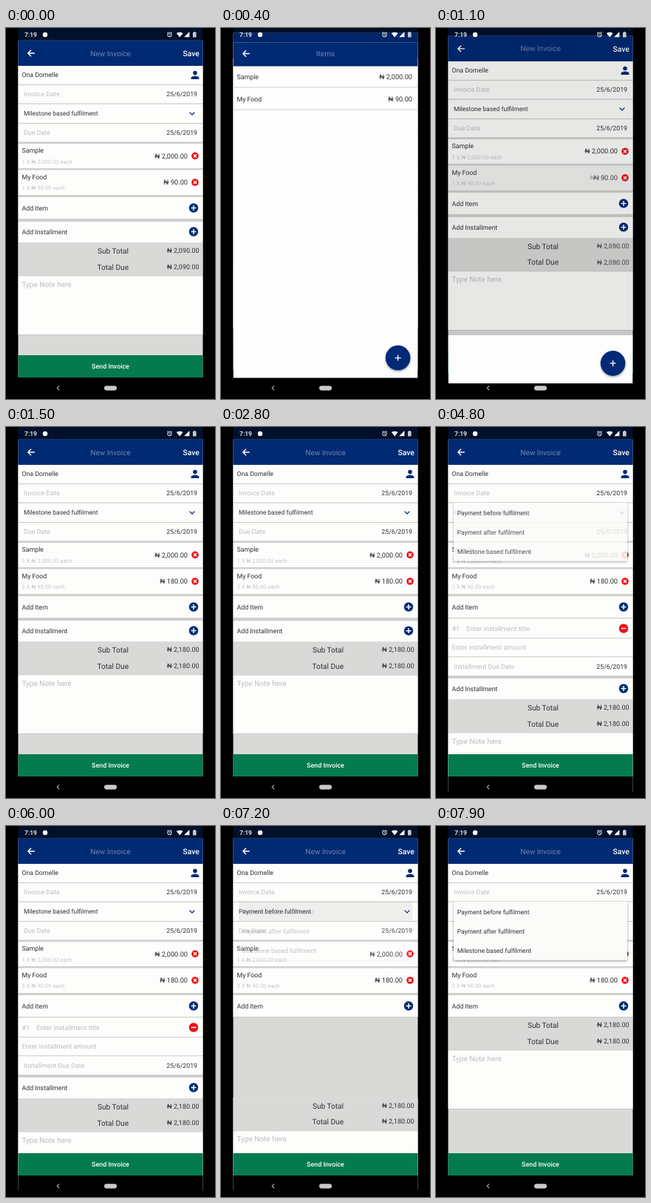
Animation, 283 px wide and 500 px high, one loop 8 s. Source, as an HTML page:

```html
<!DOCTYPE html>
<html lang="en">
<head>
<meta charset="utf-8">
<title>New Invoice</title>
<style>
html, body { margin: 0; width: 100%; height: 100%; overflow: hidden; background: #000; }
svg { display: block; width: 100%; height: 100%; }
text { font-family: Roboto, "Noto Sans", sans-serif; text-rendering: geometricPrecision; white-space: pre; }
</style>
</head>
<body>
<svg id="stage" viewBox="0 0 283 500"></svg>
<script>
const LOOP = 8000, STEP = 100;
const BLUE = '#002a74', NAVY = '#01102b', RED = '#f30d14', GREEN = '#047b4e', WHITE = '#fdfefc',
      GREY = '#d9dad8', LINE = '#cfd0ce', INK = '#303030', HINT = '#bcbcbc';
const TOP = 16.5, BOTTOM = 471, LEFT = 16.5, WIDTH = 250;

// y is the middle of the capitals
const text = (x, y, s, size, fill = INK, extra = '') =>
  `<text x="${x}" y="${y + size * 0.355}" font-size="${size}" fill="${fill}" ${extra}>${s}</text>`;
const endText = (x, y, s, size, fill = INK) => text(x, y, s, size, fill, 'text-anchor="end"');
const midText = (x, y, s, size, fill, weight = 400) =>
  text(x, y, s, size, fill, `text-anchor="middle" font-weight="${weight}"`);
const box = (y1, y2, fill, x = LEFT, w = WIDTH) =>
  `<rect x="${x}" y="${y1}" width="${w}" height="${y2 - y1}" fill="${fill}"/>`;
const stroke = (d, color, width) =>
  `<path d="${d}" fill="none" stroke="${color}" stroke-width="${width}"/>`;
const group = (id, body, extra = '') => `<g id="${id}" ${extra}>${body}</g>`;
const badge = (x, y, r, fill, d) =>
  `<g transform="translate(${x} ${y})"><circle r="${r}" fill="${fill}"/>${stroke(d, '#fff', 1.5)}</g>`;
const plus = y => badge(254, y, 6.2, BLUE, 'M-3.4 0H3.4M0 -3.4V3.4');
const minus = y => badge(254, y, 6.2, RED, 'M-3.5 0H3.5');
const cross = y => badge(256, y, 4.8, RED, 'M-2 -2L2 2M2 -2L-2 2');
const price = n => '₦ ' + n.toLocaleString('en-US', { minimumFractionDigits: 2 });

const header = title => box(0, TOP, NAVY) + box(TOP, 51, BLUE) +
  stroke('M38.8 34H30M34 29.8L29.8 34L34 38.2', '#fff', 1.4) +
  midText(141.5, 34, title, 10.1, '#6f83b0');

// a value shown before and after the quantity changes
const swap = (y, x, before, after, size) =>
  `<g class="before">${endText(x, y, price(before), size)}</g>
   <g class="after">${endText(x, y, price(after), size)}</g>`;

const dateRow = (y, label) => text(24, y, label, 8.9, HINT) + endText(259, y, '25/6/2019', 8.75);

const form =
  box(51, 76, WHITE) + box(76, 77.2, LINE) +
  box(77.2, 101.6, WHITE) + box(101.6, 102.8, LINE) +
  box(102.8, 128, WHITE) + box(128, 129.2, LINE) +
  box(129.2, 153.5, WHITE) + box(153.5, 156, LINE) +
  box(156, 189, WHITE) + box(189, 191.5, LINE) +
  box(191.5, 225, WHITE) + group('flash', box(191.5, 225, '#000')) + box(225, 228, LINE) +
  box(228, 257, WHITE) + box(257, 258.2, LINE) +
  text(21.5, 63, 'Ona Domelle', 8.7) +
  `<circle cx="256" cy="60.6" r="2.8" fill="${BLUE}"/>
   <path d="M250.6 69V67.4C250.6 63.8 261.4 63.8 261.4 67.4V69Z" fill="${BLUE}"/>` +
  dateRow(89, 'Invoice Date') +
  group('mode', text(24, 115, '', 8.5)) +
  stroke('M248.6 113.6L252 117L255.4 113.6', BLUE, 1.3) +
  dateRow(141, 'Due Date') +
  text(21.5, 165, 'Sample', 8.8) + text(21.5, 180, '1 X ₦ 2,000.00 each', 7.6, '#c6c6c6') +
  endText(246, 172.3, price(2000), 9.2) + cross(172.3) +
  text(21.5, 201, 'My Food', 8.8) + group('count', text(21.5, 215.5, '', 7.6, '#c6c6c6')) +
  swap(208, 246, 90, 180, 9.2) + cross(208) +
  text(21.5, 242.5, 'Add Item', 8.8) + plus(242.5);

const installment =
  box(258.2, 284, WHITE) + box(284, 285, LINE) +
  box(285, 309.3, WHITE) + box(309.3, 310.3, LINE) +
  box(310.3, 335, WHITE) +
  text(21.5, 271.5, '#1', 9.1, HINT) + text(41, 271.5, 'Enter installment title', 9.1, HINT) +
  minus(271.5) + text(21.5, 297, 'Enter installment amount', 9, HINT) +
  dateRow(322.5, 'Installment Due Date');

const addRow = box(257, 261, LINE) + box(261, 289, WHITE) +
  text(21.5, 274.5, 'Add Installment', 8.8) + plus(274.5);

const totals = box(289, 333.5, GREY) +
  endText(166, 300.5, 'Sub Total', 10.1) + swap(300, 261.5, 2090, 2180, 9) +
  endText(166, 322, 'Total Due', 10.1) + swap(321.5, 261.5, 2090, 2180, 9) +
  box(333.5, 334.5, LINE) + box(334.5, 413, WHITE) + box(413, 414, '#c6c7c5') +
  text(21.5, 345, 'Type Note here', 10, HINT);

const modes = ['Payment before fulfilment', 'Payment after fulfilment', 'Milestone based fulfilment'];
const menu = group('panel',
  '<rect x="24" y="102" width="235" height="78.5" rx="1" fill="#fbfcfa" filter="url(#shade)"/>') +
  group('pressed', box(102, 128, '#000', 24, 235), 'opacity="0.2"') +
  modes.map((m, i) => text(28.7, 115.5 + 26 * i, m, 8.5)).join('');

const itemRow = (y, name, n) => text(21.5, y, name, 8.8) + endText(259, y, price(n), 9.2) +
  box(y + 14, y + 15, LINE);
const items = box(TOP, BOTTOM, '#fefefe') + header('Items') +
  itemRow(65, 'Sample', 2000) + itemRow(95, 'My Food', 90) +
  `<circle cx="239.6" cy="444" r="16.8" fill="${BLUE}" filter="url(#shade)"/>` +
  stroke('M235.6 444H243.6M239.6 440V448', '#fff', 1.3);

const statusIcons =
  text(25, 9, '7:19', 8.6, '#fff', 'font-weight="500"') +
  `<circle cx="53" cy="9" r="3.2" fill="#fff"/>
   <circle cx="221.5" cy="9.2" r="2.7" fill="none" stroke="#fff" stroke-width="1"/>` +
  stroke('M221.5 7.7V9.4L222.7 10.2M218.2 6.8L220 5.2M224.8 6.8L223 5.2', '#fff', 0.8) +
  `<path d="M230.8 7Q235.2 4.4 239.6 7L235.2 12.4ZM241.2 12.3L248.4 5V12.3Z" fill="#fff"/>
   <path d="M253 6H254.2V5H256.4V6H257.6V12.6H253Z" fill="#c4c8d0"/>`;

const navIcons =
  stroke('M72 482.4L69.2 485.2L72 488', '#b5b5b5', 1.1) +
  '<rect x="133" y="482.2" width="17" height="6.2" rx="3.1" fill="#c9c9c9"/>';

const stage = document.getElementById('stage');
stage.innerHTML = `
  <defs>
    <filter id="shade" x="-20%" y="-20%" width="140%" height="150%">
      <feDropShadow dx="0" dy="1.4" stdDeviation="1.7" flood-opacity="0.4"/>
    </filter>
    <clipPath id="reveal"><rect id="revealBox" x="${LEFT}" y="0" width="${WIDTH}" height="500"/></clipPath>
  </defs>` +
  box(0, 500, '#000', 0, 283) +
  group('invoice',
    box(TOP, BOTTOM, GREY) + group('totals', totals) + group('installment', installment) +
    group('addRow', addRow) + form + header('New Invoice') +
    text(239.5, 34, 'Save', 10.3, '#fff', 'font-weight="500"') +
    box(441, BOTTOM, GREEN) + midText(141.5, 456, 'Send Invoice', 8.9, '#fff', 500) +
    box(BOTTOM, 500, '#000') + group('menu', menu)) +
  `<g clip-path="url(#reveal)">${group('items', items)}</g>` + statusIcons + navIcons;

const el = id => document.getElementById(id);
const move = (id, y) => el(id).setAttribute('transform', `translate(0 ${y})`);
const fade = (node, a) => {
  node.setAttribute('opacity', a);
  node.style.display = a > 0 ? '' : 'none';
};
const show = (id, on) => { el(id).style.display = on ? '' : 'none'; };
const ramp = (t, a, b) => Math.min(1, Math.max(0, (t - a) / (b - a)));
const smooth = (t, a, b) => (1 - Math.cos(Math.PI * ramp(t, a, b))) / 2;

// y of a cubic curve at a given x
function curve(x, [x0, y0, x1, y1, x2, y2, x3, y3]) {
  const at = (s, a, b, c, d) =>
    a * (1 - s) ** 3 + 3 * b * s * (1 - s) ** 2 + 3 * c * s * s * (1 - s) + d * s ** 3;
  let lo = 0, hi = 1;
  for (let i = 0; i < 24; i++) {
    const s = (lo + hi) / 2;
    if (at(s, x0, x1, x2, x3) < x) lo = s; else hi = s;
  }
  return at(hi, y0, y1, y2, y3);
}
const slideEase = x => x <= 0 ? 0 : x >= 1 ? 1 : curve(x, [0, 0, 0.4, 0, 0.2, 1, 1, 1]);
const clipEase = x => x <= 0 ? 0 : x >= 1 ? 1 : x < 1 / 6
  ? curve(x, [0, 0, 0.05, 0, 0.1333, 0.06, 1 / 6, 0.4])
  : curve(x, [1 / 6, 0.4, 0.2083, 0.82, 0.25, 1, 1, 1]);

function drawPages(t) {
  const enter = ramp(t, 65, 490), leave = ramp(t, 965, 1390);
  const open = slideEase(enter) - slideEase(leave);
  const shown = clipEase(enter) - clipEase(leave);
  const drop = 19 * (1 - open);
  move('invoice', -10.4 * open);
  el('invoice').setAttribute('opacity', 1 - Math.min(0.1, 0.15 * open));
  move('items', drop);
  show('items', enter > 0 && leave < 1);
  el('revealBox').setAttribute('y', shown > 0.999 ? 0 : TOP + (BOTTOM - TOP) * (1 - shown) + drop);
}

function drawInvoice(t) {
  const mix = ramp(t, 1000, 1300);
  document.querySelectorAll('.before').forEach(n => fade(n, 1 - mix));
  document.querySelectorAll('.after').forEach(n => fade(n, mix));
  fade(el('flash'), 0.2 * mix * (1 - mix));
  el('count').firstChild.textContent = `${mix < 1 ? 1 : 2} X ₦ 90.00 each`;
  el('mode').firstChild.textContent = modes[t < 7100 ? 2 : 0];

  const grow = 78 * smooth(t, 2790, 3090);
  const gone = ramp(t, 7000, 7180);
  move('addRow', grow);
  move('totals', grow - 110 * smooth(t, 7180, 7480));
  fade(el('installment'), ramp(t, 3000, 3300) * (1 - gone));
  fade(el('addRow'), 1 - gone);

  const menuAlpha = Math.max(0, ramp(t, 4550, 4850) - ramp(t, 5650, 5950) +
    ramp(t, 6350, 6650) - ramp(t, 6950, 7300) + ramp(t, 7600, 7900));
  fade(el('menu'), menuAlpha);
  fade(el('panel'), Math.min(1, 1.6 * menuAlpha));
  show('pressed', t >= 7000 && t < 7300);
}

const start = performance.now();
function frame() {
  const t = Math.floor((performance.now() - start) % LOOP / STEP) * STEP;
  drawPages(t);
  drawInvoice(t);
  requestAnimationFrame(frame);
}
frame();
</script>
</body>
</html>
```
